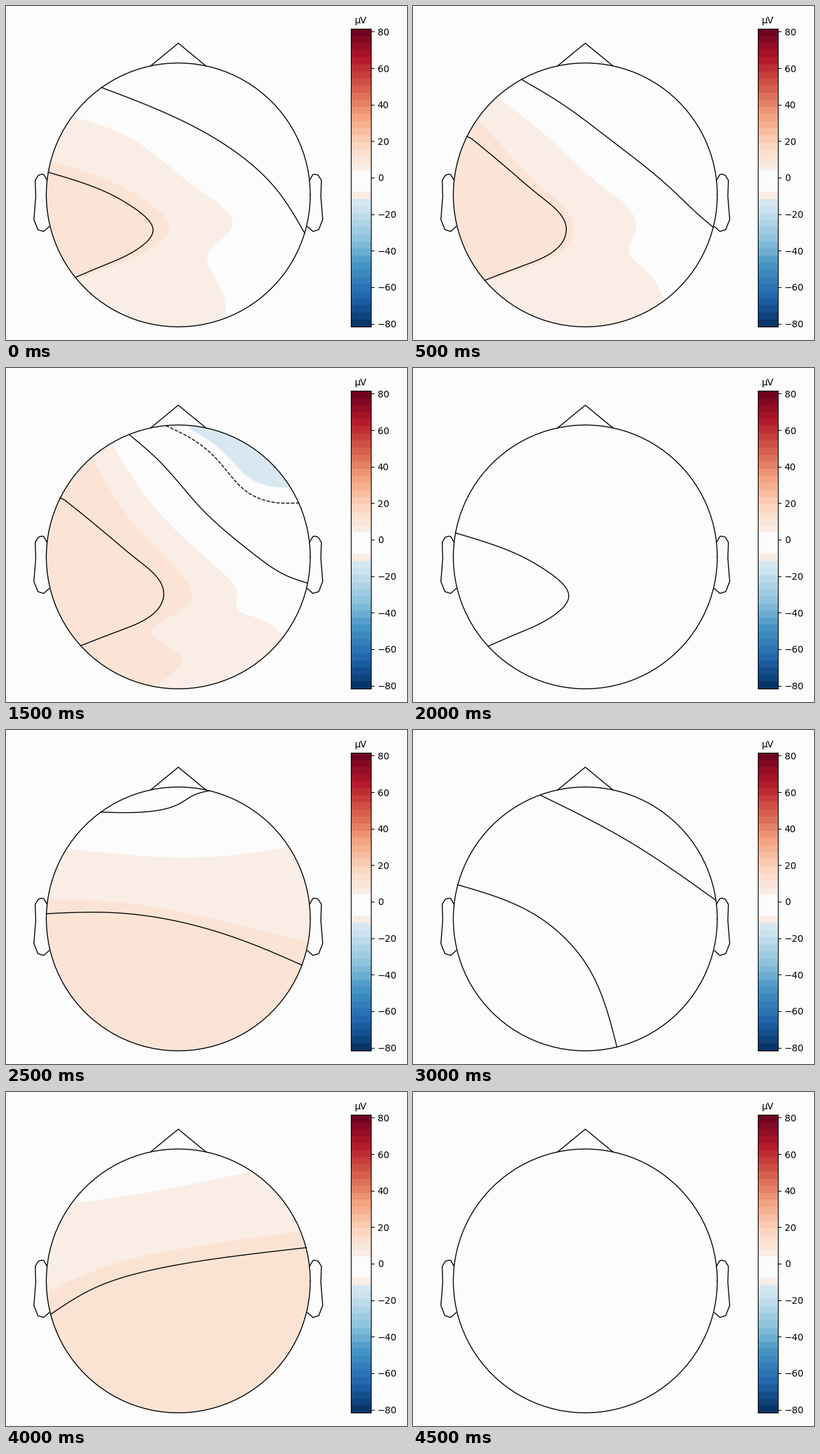
Recreate the animation shown at these times as a matplotlib script. Size 600 by 500 pixels, loop 5000 ms.

```python
import numpy as np
import matplotlib.pyplot as plt
from matplotlib.animation import FuncAnimation
from matplotlib.patches import Circle, Polygon

W, H, DPI = 600, 500, 100
C, R = np.array([257.8, 282.8]), 197.5
PAPER = "#fcfcfc"
VMAX, BANDS = 81.6, 42

cmap = plt.get_cmap("RdBu_r")


def shade(uv):
    """Colour of a voltage; values near zero are blank, with a warm rim below."""
    if -8 < uv < 5:
        return plt.matplotlib.colors.to_rgba(PAPER)
    if -11 < uv <= -8:
        uv = 6
    return cmap(0.5 + uv / (2 * VMAX))


def to_rim(p):
    return C + (p - C) * R / np.hypot(*(p - C))


def curve(*pts, n=160):
    """Natural cubic spline through key points, with both ends on the head."""
    p = np.array(pts, float)
    p[0], p[-1] = to_rim(p[0]), to_rim(p[-1])
    t = np.append(0, np.cumsum(np.hypot(*np.diff(p, axis=0).T)))
    h = np.diff(t)
    slope = np.diff(p, axis=0) / h[:, None]
    a, rhs = np.eye(len(p)), np.zeros_like(p)
    for i in range(1, len(p) - 1):
        a[i, i - 1:i + 2] = h[i - 1], 2 * (h[i - 1] + h[i]), h[i]
        rhs[i] = 6 * (slope[i] - slope[i - 1])
    m = np.linalg.solve(a, rhs)
    s = np.linspace(0, t[-1], n)
    k = np.clip(np.searchsorted(t, s, "right") - 1, 0, len(h) - 1)
    u, v, g = (s - t[k])[:, None], (t[k + 1] - s)[:, None], h[k][:, None]
    return ((m[k] * v**3 + m[k + 1] * u**3) / (6 * g)
            + (p[k] / g - m[k] * g / 6) * v + (p[k + 1] / g - m[k + 1] * g / 6) * u)


def lobe(start, tip, end):
    """Rounded tongue reaching from the left rim to a tip and back."""
    s, t, e = (np.array(p, float) for p in (start, tip, end))
    return curve(s, s + (t - s) * (0.55, 0.34), s + (t - s) * (0.79, 0.58), t,
                 e + (t - e) * (0.72, 0.52), e + (t - e) * (0.39, 0.27), e)


def mix(a, b, w=0.5):
    p = (1 - w) * a + w * b
    return np.vstack([to_rim(p[0]), p, to_rim(p[-1])])


def region(path):
    """Close a path clockwise around the head."""
    a0, a1 = (np.arctan2(*(p - C)[::-1]) for p in (path[0], path[-1]))
    arc = a1 + np.linspace(0, (a0 - a1) % (2 * np.pi), 90)
    return np.vstack([path, C + 1.02 * R * np.column_stack([np.cos(arc), np.sin(arc)])])


# Weak field, strongest on the left
left_line = lobe((64, 249), (220, 336), (104, 406))
left_sand = lobe((67, 232), (244, 332), (106, 410))
left_pale = curve((100, 166), (185, 197), (285, 272), (338, 331), (302, 372), (322, 425),
                  (330, 466))
left_zero = curve((143, 122), (245, 163), (340, 216), (405, 275), (447, 340))

# Strong field, from warm left to cool top right
warm_core = curve((86, 191), (130, 256), (191, 333), (160, 374), (102, 402))
warm_high = curve((113, 149), (150, 209), (196, 270), (236, 318), (235, 357), (180, 391),
                  (111, 415))
warm_mid = curve((127, 133), (190, 232), (255, 300), (277, 347), (217, 396), (262, 434),
                 (220, 473))
warm_low = curve((158, 112), (196, 174), (256, 245), (325, 307), (346, 340), (345, 357),
                 (378, 375), (416, 401))
strong_zero = curve((184, 99), (232, 142), (290, 208), (370, 278), (420, 311), (451, 322))
cool_low = curve((209, 92), (260, 126), (320, 190), (372, 236), (412, 253), (453, 254))
cool_mid = curve((239, 86), (290, 114), (322, 144), (360, 185), (400, 201), (438, 202))
cool_high = curve((328, 98), (360, 128), (399, 146))


def cool(a, b, w):
    return mix(a, b, w)[::-1]


# Fields that are positive at the back
back_pale = curve((91, 178), (210, 189), (320, 189), (424, 175))
back_sand = curve((62, 254), (160, 257), (310, 283), (450, 317))
back_line = curve((61, 275), (150, 273), (250, 285), (370, 321), (443, 352))
back_zero = curve((142, 123), (215, 122), (262, 109), (280, 98), (304, 92))
tilt_pale = curve((98, 167), (210, 151), (368, 118))
tilt_sand = curve((62, 299), (150, 261), (260, 235), (440, 209))
tilt_line = curve((66, 333), (125, 297), (220, 266), (340, 246), (449, 233))

# Quiet fields, lines only
calm_left = lobe((64, 247), (233, 342), (113, 416))
late_left = lobe((100, 164), (246, 318), (112, 416))
late_top = curve((229, 88), (320, 119), (355, 132), (394, 139))
turn_left = curve((68, 232), (180, 275), (262, 355), (305, 474))
turn_right = curve((190, 97), (320, 165), (454, 255))

# Each state: fills (path, voltage) in painting order, solid lines, dashed lines
STATES = [
    ([(left_pale, 6.3), (left_sand, 11)], [left_zero, left_line], []),
    ([(mix(left_pale, warm_low), 6.3), (mix(left_sand, warm_high, 0.7), 11)],
     [mix(left_zero, strong_zero), mix(left_line, warm_high)], []),
    ([(mix(warm_low, strong_zero, 0.65), 6.3), (mix(warm_low, strong_zero, 0.1), 12.5),
      (warm_mid, 16), (mix(warm_core, warm_high, 0.65), 20), (warm_core, 22),
      (cool(strong_zero, cool_low, 1.0), 6.3), (cool(cool_low, cool_mid, 0.27), -14),
      (cool(cool_mid, cool_high, 0.4), -18), (cool(cool_mid, cool_high, 0.68), -21),
      (cool(cool_mid, cool_high, 0.88), -24)],
     [warm_high, warm_low, strong_zero], [cool_low, cool_mid, cool_high]),
    ([(warm_low, 6.3), (warm_mid, 11), (cool(cool_mid, cool_high, 0.4), -14)],
     [mix(warm_high, calm_left), strong_zero], [cool_mid]),
    ([], [calm_left], []),
    ([(back_pale, 6.3), (back_sand, 11)], [back_line, back_zero], []),
    ([], [turn_left, turn_right], []),
    ([], [late_left, late_top], []),
    ([(tilt_pale, 6.3), (tilt_sand, 11.5)], [tilt_line], []),
    ([], [], []),
]

plt.rcParams.update({"font.family": "DejaVu Sans", "font.size": 10})
fig = plt.figure(figsize=(W / DPI, H / DPI), dpi=DPI, facecolor=PAPER)
ax = fig.add_axes([0, 0, 1, 1])
ax.set(xlim=(0, W), ylim=(H, 0))
ax.axis("off")


def stroke(pts, **kw):
    return ax.plot(*np.transpose(pts), color="black", lw=1, zorder=3, **kw)[0]


def draw_head():
    flip = np.array([1, -1])
    a = np.linspace(0, 2 * np.pi, 101)
    stroke(C + R * flip * np.column_stack([np.cos(a), np.sin(a)]))
    nx = np.radians(12)
    ny = np.sqrt(1 - nx**2)
    stroke(C + R * flip * np.array([(-nx, ny), (0, 1.15), (nx, ny)]))
    ear = np.array([(0.994, 0.111), (1.02, 0.155), (1.036, 0.157), (1.06, 0.149),
                    (1.084, 0.111), (1.08, -0.011), (1.094, -0.186), (1.064, -0.263),
                    (1.02, -0.277), (0.978, -0.24)])
    for side in (-1, 1):
        stroke(C + R * flip * ear * (side, 1))


def draw_bar():
    bar = fig.add_axes([516 / W, 20 / H, 30 / W, 446 / H])
    levels = VMAX * (1 - (2 * np.arange(BANDS) + 1) / BANDS)
    bar.imshow([[shade(v)] for v in levels], extent=(0, 1, -VMAX, VMAX), aspect="auto",
               interpolation="nearest")
    bar.set(xticks=[], yticks=range(-80, 81, 20))
    bar.yaxis.tick_right()
    bar.set_title("\u00b5V", fontsize=10)


draw_head()
draw_bar()
inside = Circle(C, R, transform=ax.transData)
shown = []


def clear():
    while shown:
        shown.pop().remove()
    return []


def update(i):
    clear()
    fills, solid, dashed = STATES[i]
    for path, uv in fills:
        patch = ax.add_patch(Polygon(region(path), fc=shade(uv), ec="none", zorder=1))
        patch.set_clip_path(inside)
        shown.append(patch)
    shown.extend(stroke(p) for p in solid)
    shown.extend(stroke(p, ls="--") for p in dashed)
    return shown


anim = FuncAnimation(fig, update, frames=len(STATES), init_func=clear, interval=500,
                     repeat=True, repeat_delay=0, blit=False)
plt.show()
```
